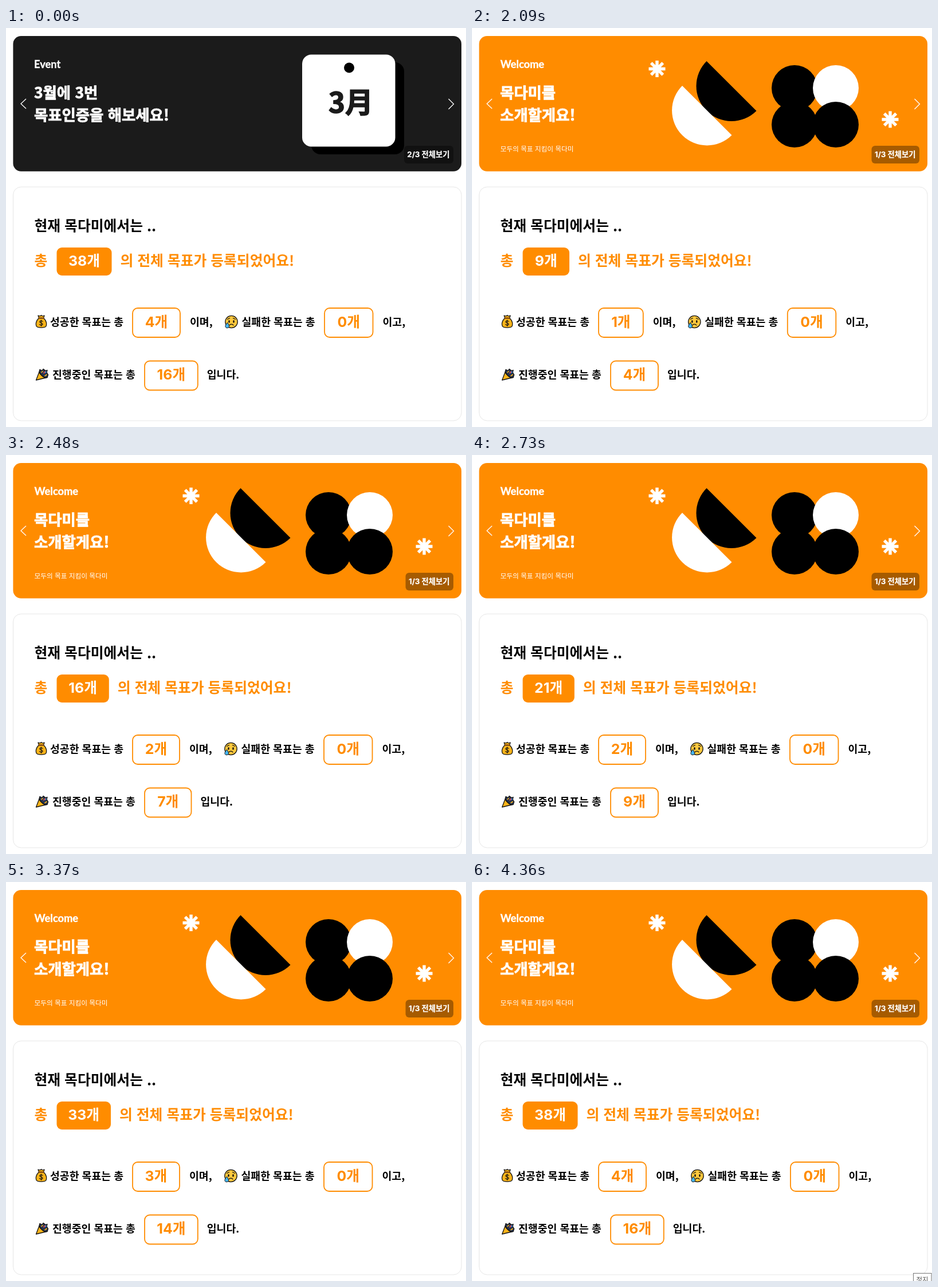
Animation of 803 by 698 pixels, one loop 4620 ms. Source, as an HTML page:

```html
<!DOCTYPE html>
<html lang="ko">
<head>
<meta charset="utf-8">
<style>
html, body { margin: 0; height: 100%; overflow: hidden; background: #fff; }
svg { display: block; width: 803px; height: 698px; }
text { font: 700 18.3px "Noto Sans CJK KR", "Noto Sans CJK JP", "Noto Sans CJK", sans-serif; white-space: pre; }
.big { font-size: 24.8px; }
.orange { fill: #ff8c00; }
.white { fill: #fff; }
.mid, .page { font-family: Inter, "Noto Sans CJK KR", "Noto Sans CJK JP", "Noto Sans CJK", sans-serif; }
.mid { text-anchor: middle; }
.label { font: 700 18.3px Lato, sans-serif; fill: #fff; stroke: #fff; stroke-width: .4; }
.title { font-size: 26.4px; font-weight: 900; fill: #fff; stroke: #fff; stroke-width: .8; }
.sub { font-size: 11.7px; font-weight: 400; fill: #fff; }
.page { font-size: 13.3px; fill: #fff; text-anchor: end; stroke: #fff; stroke-width: .2; }
.month { font-size: 49px; font-weight: 900; fill: #1b1b1b; stroke: #1b1b1b; stroke-width: 1.5; }
.tip { font-size: 11.5px; font-weight: 400; fill: #555; }
.outline { fill: #fff; stroke: #ff8c00; stroke-width: 1.8; }
.emoji { stroke: #111; stroke-width: 1.3; stroke-linejoin: round; stroke-linecap: round; }
</style>
</head>
<body>
<svg viewBox="0 0 803 698">
  <defs>
    <path id="star" d="M0-14.5V14.5M-14.5 0H14.5M-10.3-10.3L10.3 10.3M10.3-10.3L-10.3 10.3" stroke="#fff" stroke-width="5.4"/>
  </defs>

  <g id="march">
    <rect x="12.4" y="14" width="782.6" height="236.8" rx="14" fill="#1b1b1b"/>
    <text class="label" x="49" y="69.5">Event</text>
    <text class="title" x="49" y="122.5">3월에 3번</text>
    <text class="title" x="49" y="161.5">목표인증을 해보세요!</text>
    <rect x="533" y="60" width="162" height="161" rx="16"/>
    <rect x="517" y="46.5" width="162.5" height="161" rx="16" fill="#fff"/>
    <circle cx="599" cy="69.5" r="9"/>
    <text class="month" x="563" y="148">3月</text>
    <rect x="695" y="206" width="86" height="31" rx="6" fill="#111"/>
    <text class="page" x="774.5" y="225.5">2/3 전체보기</text>
  </g>

  <g id="welcome">
    <rect x="12.4" y="14" width="782.6" height="236.8" rx="14" fill="#ff8c00"/>
    <text class="label" x="49.5" y="69.5">Welcome</text>
    <text class="title" x="49" y="122.5">목다미를</text>
    <text class="title" x="49" y="161.5">소개할게요!</text>
    <text class="sub" x="49.5" y="216">모두의 목표 지킴이 목다미</text>
    <use href="#star" x="323" y="71.5"/>
    <use href="#star" x="730" y="160"/>
    <path d="M409.5 58A1 1 0 0 0 496.5 145Z"/>
    <path d="M367 101A1 1 0 0 0 453.5 187.5Z" fill="#fff"/>
    <circle cx="563" cy="105" r="40"/>
    <circle cx="635" cy="105" r="40" fill="#fff"/>
    <circle cx="563" cy="169" r="40"/>
    <circle cx="635" cy="169" r="40"/>
    <rect x="697.5" y="206" width="83.5" height="31" rx="6" opacity=".35"/>
    <text class="page" x="774.5" y="225.5">1/3 전체보기</text>
  </g>

  <path d="M35 124L26 132.5L35 141M772.5 124L781.5 133L772.5 142" fill="none" stroke="#fff" stroke-width="1.3"/>

  <rect x="12.5" y="278" width="782.5" height="409" rx="14" fill="#fff" stroke="#e6e6e6"/>
  <text class="big" x="49.5" y="354.5">현재 목다미에서는 ..</text>
  <text class="big orange" x="49.5" y="416">총</text>
  <g id="total" transform="translate(88.5 384)">
    <rect class="orange" height="49" rx="9"/>
    <text class="big white mid" y="32"></text>
    <text class="big orange tail" y="32">의 전체 목표가 등록되었어요!</text>
  </g>

  <g class="emoji" transform="translate(61.5 513.5)">
    <path d="M-4-6C-9-2-10 4-8.500 8C-7 11.500 7 11.500 8.500 8C10 4 9-2 4-6Z" fill="#fbb41a"/>
    <path d="M-4-6L-5.500-10.500L-2-9.500L0-11L2-9.500L5.500-10.500L4-6Z" fill="#fbb41a"/>
    <path d="M-4-6H4" stroke="#8a4b10" stroke-width="2"/>
    <path d="M2.500 0C1-2-3-1.500-2.500 1C-2 3 2.500 2 2.500 4.500C2.500 7-2 7-3 5M0-2.500V8" fill="none" stroke-width="1.2"/>
  </g>
  <text x="77" y="520.5">성공한 목표는 총</text>
  <g id="done" transform="translate(221 490)">
    <rect class="outline" height="51" rx="9"/>
    <text class="big orange mid" y="32.5"></text>
    <text class="tail" y="30.5">이며,</text>
  </g>

  <g id="failed">
    <g class="emoji" transform="translate(-162.5 24)">
      <circle r="10.7" fill="#ffc83d"/>
      <path d="M-7-4.500L-3-6.500M7-4.500L3-6.500M-3.500 6C-2 3.500 2 3.500 3.500 6" fill="none"/>
      <path d="M-4-1.500V.5M4-1.500V.5" stroke-width="2.4"/>
      <path d="M-7 1.500C-9 4-11 6-10.500 8.500C-10 11.500-5 11.500-4 8.500C-3.500 6-5.500 4-7 1.500Z" fill="#45b5f5" stroke-width="1"/>
    </g>
    <text x="-144.5" y="30.5">실패한 목표는 총</text>
    <rect class="outline" height="51" rx="9"/>
    <text class="big orange mid" y="32.5"></text>
    <text class="tail" y="30.5">이고,</text>
  </g>

  <g class="emoji" transform="translate(63 606.5)">
    <path d="M-5-5L-10.500 9.500L6 5.500C3 5-4-1-5-5Z" fill="#fbb41a"/>
    <path d="M-4-9L0-7L2-10L6-7L9-8L8-4L10.500 0L9 5L6 5.500C2 5-4-1-5-5Z" fill="#26344f"/>
    <path d="M-1-4L1-6M5 2L8 0" stroke="#fbb41a" stroke-width="1.6"/>
    <path d="M3-3L5-5" stroke="#e84b4b" stroke-width="1.8"/>
    <path d="M6-4L7-5" stroke="#3f8de0" stroke-width="1.8"/>
  </g>
  <text x="81" y="612.5">진행중인 목표는 총</text>
  <g id="active" transform="translate(242 582.5)">
    <rect class="outline" height="51" rx="9"/>
    <text class="big orange mid" y="32"></text>
    <text class="tail" y="30">입니다.</text>
  </g>

  <g id="tooltip">
    <rect x="770.5" y="684.5" width="31.5" height="22" fill="#fff" stroke="#767676"/>
    <text class="tip" x="775.5" y="699.5">정지</text>
  </g>
</svg>
<script>
const LOOP = 4620, COUNT_START = 1730;
const steps = [1730, 1850, 1970, 2090, 2230, 2360, 2480, 2610, 2730, 2860, 2990, 3120, 3240, 3370, 3490, 3610];
const digitWidth = [17, 9.8, 14, 14, 15, 14.5, 15, 13.5, 15.5, 15];
const $ = id => document.getElementById(id);

// Sizes the badge to its digits and returns its width.
function setBadge(id, value, padding, gap) {
  const width = [...String(value)].reduce((sum, d) => sum + digitWidth[d], padding);
  const group = $(id), number = group.querySelector('.mid');
  group.querySelector('rect').setAttribute('width', width);
  number.setAttribute('x', width / 2);
  number.textContent = value + '개';
  group.querySelector('.tail').setAttribute('x', width + gap);
  return width;
}

function draw(time) {
  const counting = time >= COUNT_START;
  const step = steps.filter(at => at <= time).length - 1;
  const progress = counting ? (2 + 2.4 * step) / 38 : 1;
  const count = goal => Math.round(goal * progress);

  $('march').style.display = counting ? 'none' : '';
  $('welcome').style.display = counting ? '' : 'none';
  setBadge('total', count(38), 66.5, 15);
  const doneWidth = setBadge('done', count(4), 68, 17);
  setBadge('failed', 0, 67.5, 17);
  $('failed').setAttribute('transform', `translate(${221 + doneWidth + 252} 490)`);
  setBadge('active', count(16), 68, 16);
  $('tooltip').style.opacity = time >= 4360 ? 1 : time >= 4240 ? .5 : 0;
}

const start = performance.now();
function tick() {
  draw((performance.now() - start) % LOOP);
  requestAnimationFrame(tick);
}
tick();
</script>
</body>
</html>
```
